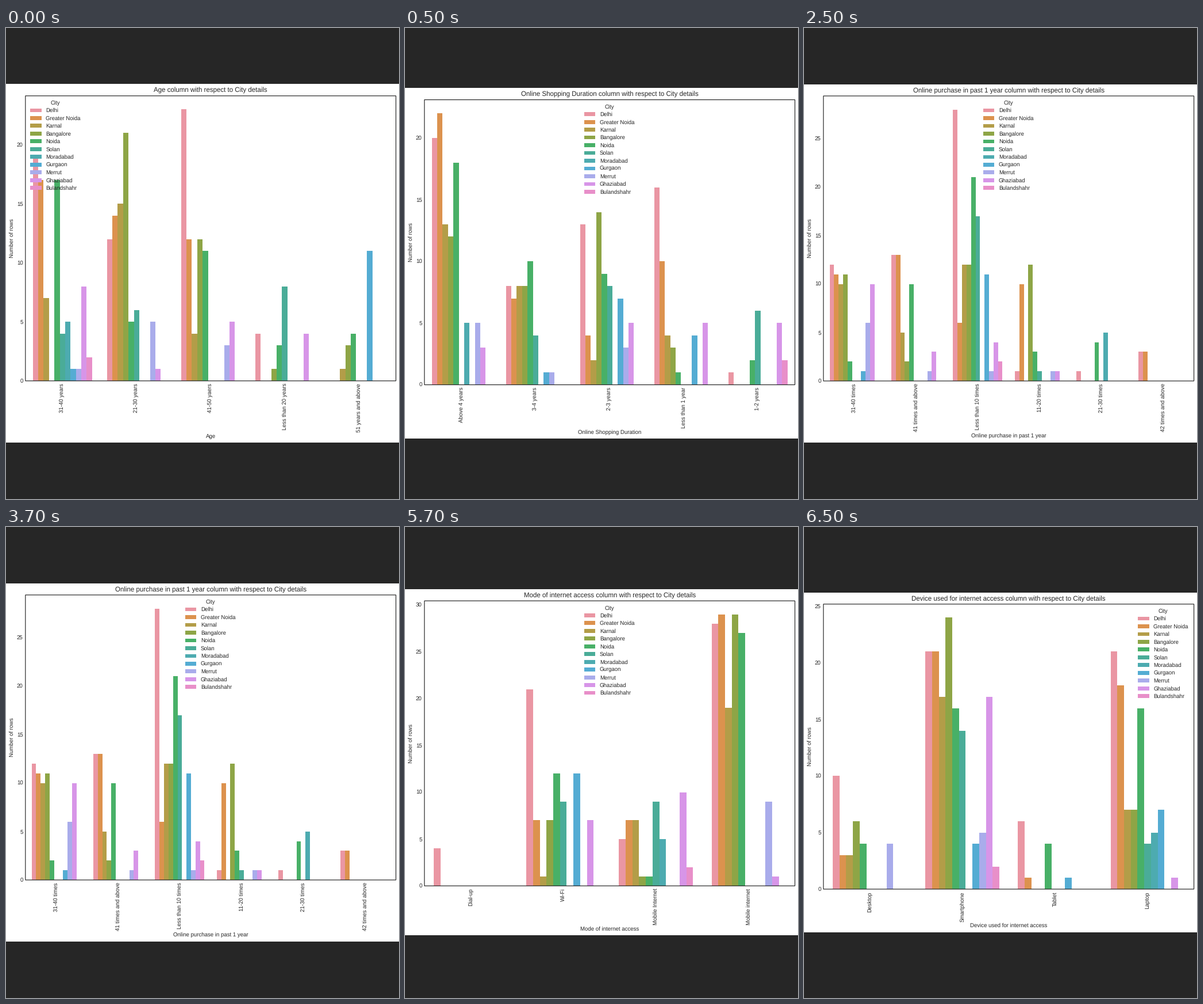
A matplotlib script for the animation above (8000 ms loop, 684x818 px).

```python
import colorsys
import math

import matplotlib.pyplot as plt
import numpy as np
from matplotlib.animation import ArtistAnimation
from matplotlib.patches import Rectangle
from matplotlib.textpath import TextPath

W, H, DPI = 684, 818, 64
INK = "#262626"
LEFT, RIGHT, PLOT_H = 33.8, 678.6, 495
MIDDLE = (LEFT + RIGHT) / 2
SMALL, LARGE = 9.63, 11.56

# People asked per city; their answers add up to this in every chart.
CITIES = {"Delhi": 58, "Greater Noida": 43, "Karnal": 27, "Bangalore": 37,
          "Noida": 40, "Solan": 18, "Moradabad": 5, "Gurgaon": 12,
          "Merrut": 9, "Ghaziabad": 18, "Bulandshahr": 2}

# The REST category takes whoever the others leave over.
REST = None

AGE = {
    "31-40 years": REST,
    "21-30 years": dict(Delhi=12, Greater=14, Karnal=15, Bangalore=21,
                        Noida=5, Solan=6, Merrut=5, Ghaziabad=1),
    "41-50 yaers": dict(Delhi=23, Greater=12, Karnal=4, Bangalore=12,
                        Noida=11, Merrut=3, Ghaziabad=5),
    "Less than 20 years": dict(Delhi=4, Bangalore=1, Noida=3, Solan=8,
                               Ghaziabad=4),
    "51 years and above": dict(Karnal=1, Bangalore=3, Noida=4, Gurgaon=11),
}
DURATION = {
    "Above 4 years": REST,
    "3-4 years": dict(Delhi=8, Greater=7, Karnal=8, Bangalore=8, Noida=10,
                      Solan=4, Gurgaon=1, Merrut=1),
    "2-3 years": dict(Delhi=13, Greater=4, Karnal=2, Bangalore=14, Noida=9,
                      Solan=8, Gurgaon=7, Merrut=3, Ghaziabad=5),
    "Less than 1 year": dict(Delhi=16, Greater=10, Karnal=4, Bangalore=3,
                             Noida=1, Gurgaon=4, Ghaziabad=5),
    "1-2 years": dict(Delhi=1, Noida=2, Solan=6, Ghaziabad=5, Bulandshahr=2),
}
PURCHASES = {
    "31-40 times": dict(Delhi=12, Greater=11, Karnal=10, Bangalore=11,
                        Noida=2, Gurgaon=1, Merrut=6, Ghaziabad=10),
    "41 times and above": dict(Delhi=13, Greater=13, Karnal=5, Bangalore=2,
                               Noida=10, Merrut=1, Ghaziabad=3),
    "Less than 10 times": REST,
    "11-20 times": dict(Delhi=1, Greater=10, Bangalore=12, Noida=3, Solan=1,
                        Merrut=1, Ghaziabad=1),
    "21-30 times": dict(Delhi=1, Noida=4, Moradabad=5),
    "42 times and above": dict(Delhi=3, Greater=3),
}
ACCESS = {
    "Dial-up": dict(Delhi=4),
    "Wi-Fi": dict(Delhi=21, Greater=7, Karnal=1, Bangalore=7, Noida=12,
                  Solan=9, Gurgaon=12, Ghaziabad=7),
    "Mobile Internet": REST,
    "Mobile internet": dict(Delhi=28, Greater=29, Karnal=19, Bangalore=29,
                            Noida=27, Merrut=9, Ghaziabad=1),
}
DEVICE = {
    "Desktop": dict(Delhi=10, Greater=3, Karnal=3, Bangalore=6, Noida=4,
                    Merrut=4),
    "Smartphone": REST,
    "Tablet": dict(Delhi=6, Greater=1, Noida=4, Gurgaon=1),
    "Laptop": dict(Delhi=21, Greater=18, Karnal=7, Bangalore=7, Noida=16,
                   Solan=4, Moradabad=5, Gurgaon=7, Ghaziabad=1),
}

# (column name, answers, legend place from 0 = left to 1 = right)
CHARTS = [
    ("Age", AGE, 0),
    ("Online Shopping Duration", DURATION, 0.5),
    ("Online purchase in past 1 year", PURCHASES, 0.5),
    ("Mode of internet access", ACCESS, 0.5),
    ("Device used for internet access", DEVICE, 1),
]

XYZ_TO_RGB = np.array([[3.2406, -1.5372, -0.4986],
                       [-0.9689, 1.8758, 0.0415],
                       [0.0557, -0.2040, 1.0570]])


def max_chroma(light, angle):
    """Largest LUV chroma inside the sRGB gamut."""
    sub = ((light + 16) / 116) ** 3
    lengths = []
    for m1, m2, m3 in XYZ_TO_RGB:
        for t in (0, 1):
            bottom = (632260 * m3 - 126452 * m2) * sub + 126452 * t
            slope = (284517 * m1 - 94839 * m3) * sub / bottom
            cross = ((838422 * m3 + 769860 * m2 + 731718 * m1) * light * sub
                     - 769860 * t * light) / bottom
            lengths.append(cross / (math.sin(angle) - slope * math.cos(angle)))
    return min(d for d in lengths if d > 0)


def husl(hue, sat, light):
    angle = math.radians(hue)
    chroma = max_chroma(light, angle) * sat / 100
    u = chroma * math.cos(angle) / (13 * light) + 0.19784
    v = chroma * math.sin(angle) / (13 * light) + 0.46834
    y = ((light + 16) / 116) ** 3
    x = 9 * y * u / (4 * v)
    z = (9 * y - 15 * v * y - v * x) / (3 * v)
    linear = np.clip(XYZ_TO_RGB @ [x, y, z], 0, 1)
    return np.where(linear <= 0.0031308, 12.92 * linear,
                    1.055 * linear ** (1 / 2.4) - 0.055)


def muted(rgb):
    h, l, s = colorsys.rgb_to_hls(*rgb)
    return colorsys.hls_to_rgb(h, l, s * 0.75)


COLORS = [muted(husl((i / len(CITIES) + 0.01) * 359, 0.9 * 99, 0.7 * 99))
          for i in range(len(CITIES))]

plt.rcParams.update({"font.family": "Liberation Sans", "text.hinting": "none"})
fig = plt.figure(figsize=(W / DPI, H / DPI), dpi=DPI, facecolor=INK)
ax = fig.add_axes([0, 0, 1, 1])
ax.set(xlim=(0, W), ylim=(H, 0))
ax.axis("off")


def rect(x0, y0, x1, y1, color, z):
    return ax.add_patch(Rectangle((x0, y0), x1 - x0, y1 - y0,
                                  fc=color, lw=0, zorder=z))


def label(x, y, text, size=SMALL, ha="center", va="baseline", rotation=0):
    return ax.text(x, y, text, fontsize=size * 72 / DPI, color=INK, ha=ha,
                   va=va, rotation=rotation, zorder=6)


def text_width(text):
    return TextPath((0, 0), text, size=SMALL).get_extents().width


def count_rows(answers):
    """One list of counts per category, with REST worked out."""
    rows = {category: [(given or {}).get(city.split()[0], 0) for city in CITIES]
            for category, given in answers.items()}
    left_over = np.array(list(CITIES.values())) - np.sum(list(rows.values()), 0)
    return {category: left_over if answers[category] is REST else row
            for category, row in rows.items()}


def draw_legend(x, top):
    parts = [label(x + 43.6, top + 15.2, "City")]
    for i, (city, color) in enumerate(zip(CITIES, COLORS)):
        y = top + 25.1 + 13.47 * i
        parts += [rect(x, y - 3.4, x + 19.4, y + 3.4, color, 5),
                  label(x + 27, y + 3.3, city, ha="left")]
    return parts


def draw_chart(name, answers, legend_place):
    rows = count_rows(answers)
    # The panel grows with its longest category name and stays centred.
    panel_h = 538.6 + max(map(text_width, rows))
    panel_top = (H - 0.8 - panel_h) / 2
    panel_bottom = panel_top + panel_h
    top = panel_top + 20.4
    base = top + PLOT_H
    y_max = 1.05 * max(map(max, rows.values()))
    unit = PLOT_H / y_max
    group_w = (RIGHT - LEFT) / len(rows)
    bar_w = 0.8 * group_w / len(CITIES)

    parts = [rect(0, panel_top, W, panel_bottom, "white", 1)]
    for g, (category, row) in enumerate(rows.items()):
        start = LEFT + (g + 0.1) * group_w
        for i, count in enumerate(row):
            if count:
                x = start + i * bar_w
                parts.append(rect(x, base - count * unit, x + bar_w, base,
                                  COLORS[i], 2))
        parts.append(label(start + 0.4 * group_w, base + 4.3, category,
                           va="top", rotation=90))

    frame = Rectangle((LEFT, top), RIGHT - LEFT, PLOT_H, fill=False, ec=INK,
                      lw=1.2 * 72 / DPI, snap=False, zorder=4)
    parts.append(ax.add_patch(frame))
    for tick in range(0, int(y_max) + 1, 5):
        parts.append(label(29.7, base - tick * unit, tick, ha="right",
                           va="center_baseline"))
    parts += [
        label(MIDDLE, top - 5.8, f"{name} column with respect to City details",
              LARGE),
        label(MIDDLE, panel_bottom - 8.3, name),
        label(10.6, (top + base) / 2, "Number of rows", va="center",
              rotation=90),
    ]
    return parts + draw_legend(42.3 + 538.9 * legend_place, top)


scenes = [draw_chart(*chart) for chart in CHARTS]

# Sixteen half-second steps: the first chart holds one step, the others up to four.
anim = ArtistAnimation(fig, [scenes[(i + 3) // 4] for i in range(16)],
                       interval=500, repeat=True, repeat_delay=0)
plt.show()
```
